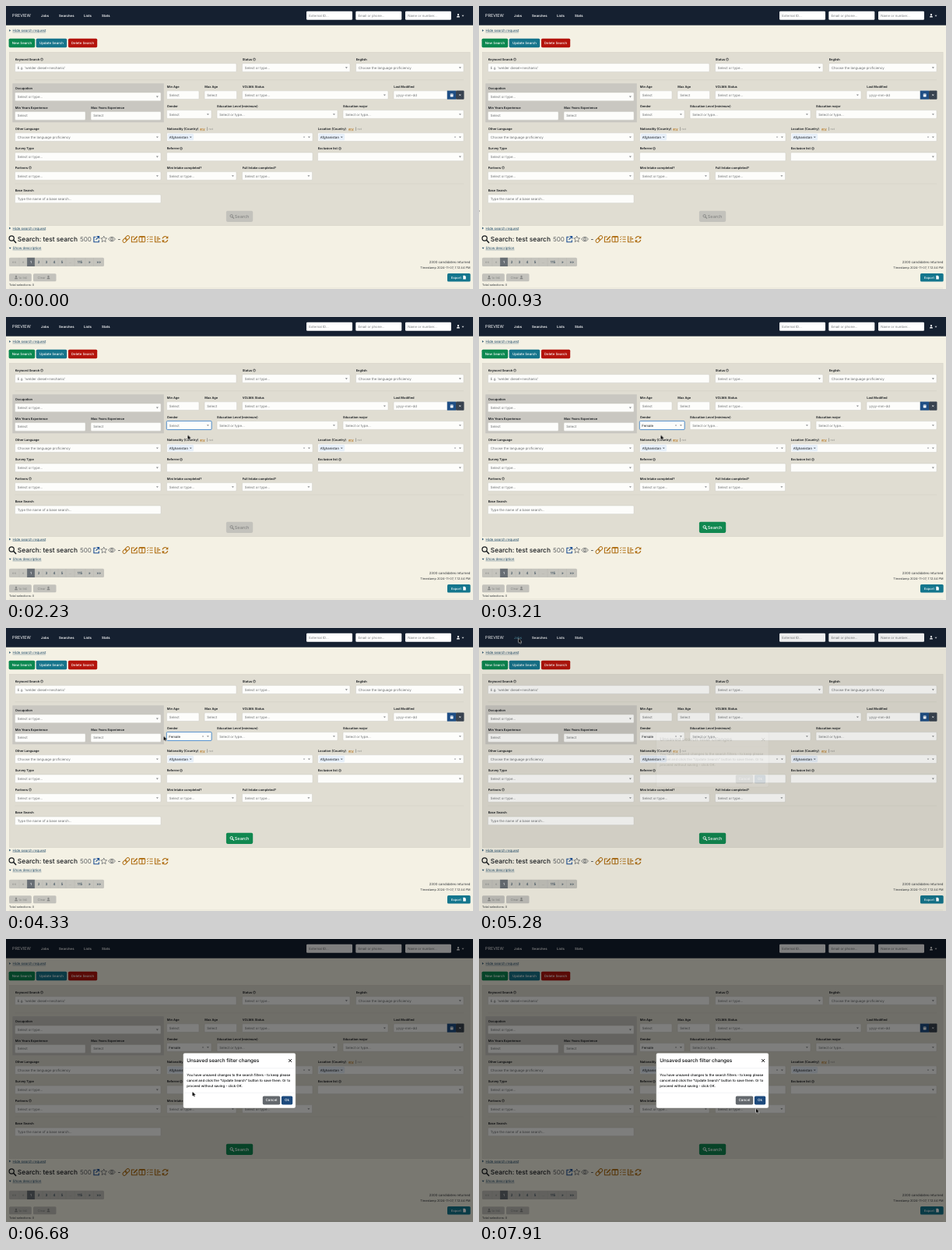
These frames come from a looping animation (600 px wide and 363 px high, 8 s). An HTML page:

```html
<!DOCTYPE html>
<html lang="en">
<head>
<meta charset="utf-8">
<title>Candidate search</title>
<style>
  html, body { margin: 0; width: 100%; height: 100%; overflow: hidden; background: #f4f1e4; }
  svg { display: block; width: 100vw; height: 100vh; }
  text { font-family: Inter, "Open Sans", sans-serif; text-rendering: geometricPrecision; white-space: pre; }
  .anim { animation: 8s linear infinite; }
  .step { animation-timing-function: step-end; }
  .idle { animation-name: idle; }
  .chosen { animation-name: chosen; }
  .focus { animation-name: focus; }
  .hover { animation-name: hover; }
  .shade { animation-name: shade; }
  .modal { animation-name: modal; }
  .cursor { animation-name: cursor; animation-timing-function: ease-in-out; }
  @keyframes idle { 0% { opacity: 1 } 32.5%, 100% { opacity: 0 } }
  @keyframes chosen { 0% { opacity: 0 } 32.5%, 100% { opacity: 1 } }
  @keyframes focus { 0% { opacity: 0 } 25.125% { opacity: 1 } 65%, 100% { opacity: 0 } }
  @keyframes hover { 0% { fill: #f1f2f3 } 62.25% { fill: #46788a } 67.375%, 100% { fill: #f1f2f3 } }
  @keyframes shade { 0% { opacity: 0 } 66% { opacity: .065 } 67.375%, 100% { opacity: .5 } }
  @keyframes modal {
    0% { opacity: 0; transform: translateY(-20px) }
    66% { opacity: .12; transform: translateY(-13px) }
    67.375% { opacity: 1; transform: translateY(-5.5px) }
    68.375%, 100% { opacity: 1; transform: none }
  }
  @keyframes cursor {
    0%, 10.625% { transform: translate(-8px, 262px) }
    20.5%, 25.125% { transform: translate(234.5px, 140px) }
    27.875%, 40.125% { transform: translate(233.5px, 151.5px) }
    42.25%, 45.75% { transform: translate(229px, 154px) }
    49.625%, 53.5% { transform: translate(204px, 140px) }
    62.625%, 69.5% { transform: translate(51px, 13.5px) }
    73.375%, 74.625% { transform: translate(120px, 84px) }
    78.125%, 83.25% { transform: translate(238px, 195px) }
    83.5%, 89.125% { transform: translate(239.5px, 196px) }
    98.875%, 100% { transform: translate(356px, 217.5px) }
  }
</style>
</head>
<body>
<svg id="stage" viewBox="0 0 600 363" preserveAspectRatio="none"></svg>
<script>
const INK = '#15191d', HINT = '#696c6e', LINK = '#1c4765', BROWN = '#ad6a0c', CREAM = '#f4f1e4';

const rect = (x, y, w, h, fill, r = 1, extra = '') =>
  `<rect x="${x}" y="${y}" width="${w}" height="${h}" rx="${r}" fill="${fill}" ${extra}/>`;
const text = (x, y, s, size = 4.35, fill = INK, weight = 400, extra = '') =>
  `<text x="${x}" y="${y}" font-size="${size}" fill="${fill}" font-weight="${weight}" ${extra}>${s}</text>`;
const line = (d, color, width = .6, extra = '') =>
  `<path d="${d}" fill="none" stroke="${color}" stroke-width="${width}" ${extra}/>`;
const shape = (d, fill) => `<path d="${d}" fill="${fill}"/>`;
const group = (cls, body) => `<g class="anim ${cls}">${body}</g>`;
const mid = 'text-anchor="middle"', end = 'text-anchor="end"';

const caret = (x, y, c = '#85878a') => shape(`M${x - 1.5} ${y - .8}h3l-1.5 1.9z`, c);
const cross = (x, y, r, c, w) => line(`M${x - r} ${y - r}l${2 * r} ${2 * r}m0 ${-2 * r}l${-2 * r} ${2 * r}`, c, w);
const field = (x, y, w) => rect(x, y, w, 10.7, '#fdfdfb', 1.2, 'stroke="#c9c9c3" stroke-width=".45"');
const hint = (x, y) => `<circle cx="${x}" cy="${y}" r="1.55" fill="none" stroke="${INK}" stroke-width=".5"/>` +
  text(x, y + .95, '?', 2.6, INK, 700, mid);
const button = (x, y, w, h, fill, label, size = 4.3, color = '#fff') =>
  rect(x, y, w, h, fill, 1.6) + text(x + w / 2, y + h / 2 + size * .35, label, size, color, 500, mid);
const lens = (x, y, r, c, w) =>
  `<circle cx="${x}" cy="${y}" r="${r}" fill="none" stroke="${c}" stroke-width="${w}"/>` +
  line(`M${x + r * .75} ${y + r * .75}l${r} ${r}`, c, w * 1.25, 'stroke-linecap="round"');
const person = (x, y, c) => `<circle cx="${x}" cy="${y - 1.1}" r="1.15" fill="${c}"/>` +
  shape(`M${x - 2} ${y + 2.3}q0-2 2-2t2 2z`, c);

// x, y of the box, width, label, placeholder, has a caret, x of the help sign
const fields = [
  [11.5, 73.7, 284.5, 'Keyword Search', "E.g. 'welder diesel+mechanic'", 0, 46],
  [303.5, 73.7, 138.5, 'Status', 'Select or type...', 1, 319],
  [449.5, 73.7, 138.5, 'English', 'Choose the language proficiency', 1],
  [11.5, 111, 187.5, 'Occupation', 'Select or type...', 1],
  [11.5, 135.5, 90.5, 'Min Years Experience', 'Select'],
  [109, 135.5, 90, 'Max Years Experience', 'Select'],
  [206.5, 108.8, 41.5, 'Min Age', 'Select'],
  [255, 108.8, 41.5, 'Max Age', 'Select'],
  [303.5, 108.8, 187.5, 'VOLMA Status', 'Select or type...', 1],
  [498, 108.8, 69, 'Last Modified', 'yyyy-mm-dd'],
  [206.5, 133.6, 57.5, 'Gender', '', 1],
  [271, 133.6, 155, 'Education Level (minimum)', 'Select or type...', 1],
  [433, 133.6, 155, 'Education major', 'Select or type...', 1],
  [11.5, 162.8, 187.5, 'Other Language', 'Choose the language proficiency', 1],
  [206.5, 162.8, 187.5, 'Nationality (Country)', '', 1],
  [400.5, 162.8, 187.5, 'Location (Country)', '', 1],
  [11.5, 188, 187.5, 'Survey Type', 'Select or type...', 1],
  [206.5, 188, 187.5, 'Referrer', '', 0, 225],
  [400.5, 188, 187.5, 'Exclusion list', '', 1, 429],
  [11.5, 212.6, 187.5, 'Partners', 'Select or type...', 1, 31],
  [206.5, 212.6, 89.5, 'Mini Intake completed?', 'Select or type...', 1],
  [303.5, 212.6, 90, 'Full Intake completed?', 'Select or type...', 1],
  [11.5, 242, 187.5, 'Base Search', 'Type the name of a base search...']
];

function header() {
  let s = rect(0, 0, 600, 24.7, '#152030', 0) + text(8, 14.4, 'PREVIEW', 5.4, '#f8f9fa');
  s += text(45, 14.2, 'Jobs', 4.3, '#f1f2f3', 600, 'class="anim step hover"');
  [[68, 'Searches'], [100, 'Lists'], [123, 'Stats']].forEach(([x, t]) => s += text(x, 14.2, t, 4.3, '#f8f9fa', 600));
  [[386, 'External ID...'], [449.3, 'Email or phone...'], [513, 'Name or number...']].forEach(([x, t]) =>
    s += rect(x, 6.8, 59, 11, '#fff', 1.3) + text(x + 3.2, 14, t, 4.3, '#75787b'));
  return s + person(581, 12.2, '#f8f9fa') + caret(587, 12.6, '#c9ccd0');
}

function disclosure(y, label, w, open) {
  return shape(open ? `M3.8 ${y - 2.3}h2.8l-1.4 2z` : `M4.2 ${y - 3}v2.8l1.9-1.4z`, LINK) +
    text(8.5, y, label, 4.5, LINK) + line(`M8.5 ${y + .9}h${w}`, LINK, .35);
}

function countryTag(x, anyX) {
  return rect(x + 1.7, 164.3, 32.5, 7.6, '#e9f1fb', 1, 'stroke="#cfdff0" stroke-width=".3"') +
    text(x + 3.2, 169.7, 'Afghanistan', 4.3) + cross(x + 30.8, 168.2, .9, '#3c4650', .6) +
    cross(x + 176.5, 168.1, .9, '#85878a', .5) +
    text(anyX, 158.7, 'any', 3.8, '#b8741a', 500, 'text-decoration="underline"') +
    text(anyX + 9, 158.7, '|', 3.8) + text(anyX + 11.5, 158.7, 'not', 3.6, '#8c8c88');
}

function filters() {
  let s = rect(4.3, 59.2, 591.8, 222.5, '#e0ddd2', 0, 'stroke="#d3d0c5" stroke-width=".5"') +
    line('M11.5 94.8H588M11.5 228H588', '#cdcac0', .5) + rect(8.3, 99.2, 194.5, 50, '#c9c7c1', .5);
  fields.forEach(([x, y, w, label, placeholder, drop, help]) => {
    s += text(x + .2, y - 3.9, label, 4, INK, 600) + field(x, y, w);
    if (placeholder) s += text(x + 3.3, y + 6.9, placeholder, 4.35, HINT);
    if (drop) s += caret(x + w - 4.6, y + 5.4);
    if (help) s += hint(help, y - 5.2);
  });
  s += rect(566.8, 108.6, 11.2, 11.1, '#1f4f86', 0) + rect(578, 108.6, 10.5, 11.1, '#38424f', 1) +
    rect(570.8, 112.6, 3.8, 3.8, '#fff', .4) + line('M571 113.7h3.4', '#1f4f86', .4) + cross(583.3, 114.2, 1, '#fff', .7);
  s += countryTag(206.5, 249) + countryTag(400.5, 440);
  s += group('step idle', text(209.8, 140.5, 'Select', 4.35, HINT));
  s += group('step focus', rect(206.3, 133.4, 57.9, 11.1, 'none', 1.2, 'stroke="#4a8cd0" stroke-width=".9"'));
  s += group('step chosen', text(209.3, 140.5, 'Female', 4.35) + cross(253, 139, .9, '#85878a', .5));
  const search = (bg, fg) => rect(282.9, 262.8, 34.3, 14.1, bg, 1.8) + lens(289.7, 269.3, 1.7, fg, .9) +
    text(293.8, 271.9, 'Search', 5.5, fg, 500);
  return s + group('step idle', search('#c3c2bc', '#858684')) + group('step chosen', search('#118850', '#fff'));
}

function toolIcons() {
  const b = (d, w = 1.05) => line(d, BROWN, w, 'stroke-linejoin="round"');
  const blue = '#1c4f94', grey = '#5d6164';
  let star = '';
  for (let i = 0; i < 10; i++) {
    const a = i * Math.PI / 5, r = i % 2 ? 1.9 : 4.2;
    star += `${i ? 'L' : 'M'}${(125.7 + r * Math.sin(a)).toFixed(2)} ${(299.2 - r * Math.cos(a)).toFixed(2)}`;
  }
  return line('M115.5 296.2h-2.6v6.6h6.4v-2.6M116.6 295.6h3v3M119.4 295.8l-3.9 3.9', blue, 1.1) +
    line(star + 'Z', grey, .7) +
    line('M131.6 299q4.4-5.6 8.8 0q-4.4 5.6-8.8 0z', grey, .8) +
    `<circle cx="136" cy="299" r="1.5" fill="none" stroke="${grey}" stroke-width=".8"/>` +
    text(143.6, 302, '-', 8.2) +
    '<g transform="rotate(-45 154.3 299)">' + rect(149, 297, 6, 4, 'none', 2, `stroke="${BROWN}"`) +
    rect(153.6, 297, 6, 4, 'none', 2, `stroke="${BROWN}"`) + '</g>' +
    b('M165 296h-3.6v6.8h6.8v-3.6') + b('M164 300.3l4.6-4.8', 1.6) +
    rect(171, 295.5, 7.6, 7.2, 'none', .6, `stroke="${BROWN}"`) + b('M171 296.3h7.6M174.8 296v6.6') +
    b('M181 296l.8.8 1.3-1.5M181 299l.8.8 1.3-1.5M181.3 302.3h1.4M184.5 296.2h4.2M184.5 299.2h4.2M184.5 302.3h4.2', .9) +
    b('M191.5 295v7.7h7.5M193.5 296.5h3M193.5 298.6h4.6M193.5 300.7h2.4') +
    b('M201 298.4q1.2-3 3.6-3t3.2 2.2M207.8 300q-1.2 3-3.6 3t-3.2-2.2') +
    shape('M208.3 295v3.2h-3.2zM200.7 303.4v-3.2h3.2z', BROWN);
}

function results() {
  let s = lens(7.2, 298, 3.1, INK, 1.2) + text(14.8, 302, 'Search: test search', 8.35, INK, 500) +
    text(95, 302, '500', 8, '#5d6164') + toolIcons() + disclosure(312, 'Show description', 37, true);
  const pages = ['««', '«', '1', '2', '3', '4', '5', '...', '115', '»', '»»'];
  const widths = [13, 10, 10, 10, 10, 10, 10, 11, 14, 10.5, 13.5];
  let x = 4;
  s += rect(4, 322.8, 122, 11.2, '#c5c4bd', 1.6);
  pages.forEach((p, i) => {
    const on = i === 2, color = on ? '#fff' : i < 2 || i === 7 ? '#929390' : '#2f4454';
    if (on) s += rect(x, 322.8, widths[i], 11.2, '#686e74', 0);
    s += text(x + widths[i] / 2, 330, p, 4.4, color, 500, mid) +
      (i ? line(`M${x} 323v10.8`, '#b4b4ae', .3) : '');
    x += widths[i];
  });
  s += rect(4, 343.3, 28.8, 10, '#c3c2bc', 1.5) + person(13, 348, '#858684') + text(16.5, 349.9, 'to list', 4.1, '#858684') +
    rect(35, 343.3, 29.5, 10, '#c3c2bc', 1.5) + text(40.5, 349.9, 'Clear', 4.1, '#858684') + person(54.5, 348, '#858684');
  s += text(4, 359.2, 'Total selections: 0', 3.75, '#33373a') +
    text(596.5, 329.8, '2300 candidates returned', 4.3, '#33373a', 400, end) +
    text(596.5, 337.2, 'Timestamp 2024-11-07, 1:12:44 PM', 3.9, '#33373a', 400, end);
  return s + rect(567, 342.9, 29.7, 10.5, '#14768d', 1.5) + text(572, 349.7, 'Export', 4.1, '#fff', 500) +
    shape('M587.3 345.8h2.2l1.3 1.3v3.4h-3.5z', '#fff') + line('M4 361.8H596', '#d5d2c7', .4);
}

function modal() {
  const body = ['You have unsaved changes to the search filters - to keep please',
    'cancel and click the "Update Search" button to save them. Or to', 'proceed without saving - click OK.'];
  let s = rect(227.6, 146.2, 144.6, 70.8, '#fff', 2.2, 'stroke="#6b6a65" stroke-width=".4"') +
    text(232.3, 158.3, 'Unsaved search filter changes', 6.4, '#050708', 500) + cross(365.2, 156, 2, '#111', .95) +
    line('M227.8 165.8h144.2M227.8 197.3h144.2', '#dee0e2', .4);
  body.forEach((t, i) => s += text(232.3, 175.9 + i * 6.9, t, 4.36, '#050708', 500));
  return s + button(329.8, 201.4, 22.4, 11, '#63686d', 'Cancel', 4.5) + button(353.9, 201.4, 14.3, 11, '#1d4a7d', 'Ok', 4.5);
}

document.getElementById('stage').innerHTML =
  rect(0, 0, 600, 363, CREAM, 0) + header() +
  disclosure(33, 'Hide search request', 42.5) +
  button(3.6, 41.7, 33.6, 11.5, '#0b8850', 'New Search', 4.4) +
  button(38.7, 41.7, 39.5, 11.5, '#16748b', 'Update Search', 4.4) +
  button(80, 41.7, 37.2, 11.5, '#b4140c', 'Delete Search', 4.4) +
  filters() + disclosure(286.6, 'Hide search request', 42.5) + results() +
  group('step shade', rect(0, 0, 600, 363, '#000', 0)) +
  group('step modal', modal()) +
  group('cursor', '<path d="M0 0v5.4l1.3-1.1.9 2 1-.4-.9-1.9h1.7z" fill="#000" stroke="#fff" stroke-width=".9" paint-order="stroke"/>');
</script>
</body>
</html>
```
